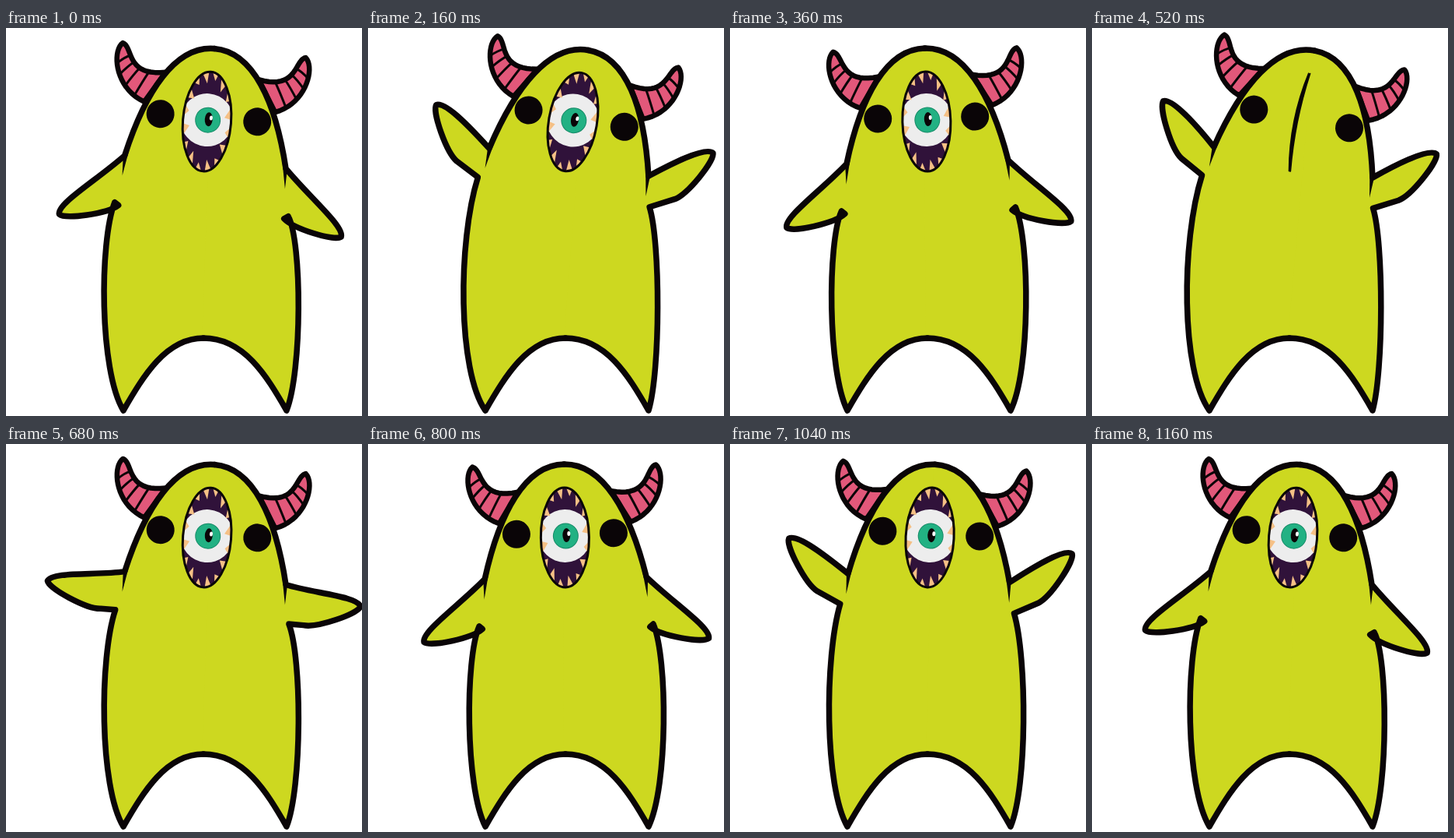
These frames come from a looping animation (458 by 498 pixels, 1.2 s). An HTML page with a canvas:

```html
<!DOCTYPE html>
<html lang="en">
<head>
<meta charset="utf-8">
<title>Dancing monster</title>
<style>
html, body { margin: 0; width: 100%; height: 100%; overflow: hidden; background: #fff; }
canvas { display: block; }
</style>
</head>
<body>
<canvas id="stage" width="458" height="498"></canvas>
<script>
const ctx = document.getElementById('stage').getContext('2d');
const STEP = 40, STEPS = 30, RAD = Math.PI / 180, TAU = Math.PI * 2;
const SKIN = '#cdd820', INK = '#0a0507', PINK = '#e2587a', TOOTH = '#f5c085';
const BLINK = 13;

// turning points: step, degrees
const ARM_SWING = [[0, 36], [4.3, -38], [9, 35], [13.2, -39], [20.6, 36], [25.6, -38], [29, 36]];
const HEAD_SWING = [[0, 0], [4.5, 5.4], [9, -5.9], [13.2, 6.4], [20.5, -5.5], [29, 0]];

let lean = 0, drop = 0;

function swing(keys, k) {
  const i = keys.findIndex(key => key[0] >= k);
  if (i < 1) return keys[0][1];
  const [t0, a] = keys[i - 1], [t1, b] = keys[i];
  return a + (b - a) * (1 - Math.cos(Math.PI * (k - t0) / (t1 - t0))) / 2;
}

const stageFrame = () => ctx.setTransform(1, 0, 0, 1, 0, 0);

// tilted frame with its origin at the neck, mirrored for side -1
function headFrame(side) {
  ctx.setTransform(1, 0, 0, 1, 254.5, 195);
  ctx.rotate((4.6 + lean) * RAD);
  ctx.scale(side, 1);
}

function oval(x, y, rx, ry, color) {
  ctx.fillStyle = color;
  ctx.beginPath();
  ctx.ellipse(x, y, rx, ry, 0, 0, TAU);
  ctx.fill();
}

function bezier(p0, p1, p2, p3) {
  return t => [0, 1].map(i => {
    const u = 1 - t;
    return u * u * u * p0[i] + 3 * u * u * t * p1[i] + 3 * u * t * t * p2[i] + t * t * t * p3[i];
  });
}

const hornOut = bezier([118, -167], [132, -155], [123, -103], [78, -92]);
const hornIn = bezier([118, -167], [104, -163], [111, -124], [60, -134]);

function horn(side) {
  headFrame(side);
  ctx.beginPath();
  for (let t = 0; t <= 1; t += 0.05) ctx.lineTo(...hornOut(t));
  for (let t = 1; t >= 0; t -= 0.05) ctx.lineTo(...hornIn(t));
  ctx.closePath();
  ctx.fillStyle = PINK;
  ctx.fill();
  ctx.lineWidth = 6.5;
  ctx.stroke();
  ctx.lineWidth = 3;
  for (let i = 0; i < 4; i++) {
    const t = 0.38 + i * 0.15, [x, y] = hornOut(t), [u, v] = hornIn(t);
    ctx.beginPath();
    ctx.moveTo(x, y);
    ctx.quadraticCurveTo((x + u) / 2 - 1, (y + v) / 2 - 3, u, v);
    ctx.stroke();
  }
}

// outline of one half, from the top of the head round to the crotch
function traceHalf(side) {
  ctx.beginPath();
  headFrame(side);
  ctx.moveTo(0, -169);
  ctx.bezierCurveTo(50, -169, 84, -108, 104, -23);
  ctx.translate(97, -3);
  ctx.rotate(drop * RAD);
  ctx.bezierCurveTo(42, -12, 100, -13, 105, 0);
  ctx.bezierCurveTo(102, 10, 52, 32, 34, 30);
  headFrame(side);
  ctx.lineTo(112, 27 + 0.3 * drop);
  stageFrame();
  const hip = 250.5 + side * 130.5 - 0.9 * lean;
  ctx.bezierCurveTo(hip, 275, hip, 440, 256 + side * 105, 491);
  ctx.bezierCurveTo(256 + side * 79, 446, 256 + side * 50, 398, 254, 398);
}

function body() {
  for (const side of [-1, 1]) {
    traceHalf(side);
    ctx.lineTo(254 - side * 2, 398);
    headFrame(side);
    ctx.lineTo(-2, -169);
    stageFrame();
    ctx.fillStyle = SKIN;
    ctx.fill();
  }
  for (const side of [-1, 1]) {
    traceHalf(side);
    ctx.lineWidth = 7.5;
    ctx.stroke();
    shoulder(side);
  }
}

// tapered end of the head line inside the shoulder
function shoulder(side) {
  headFrame(side);
  ctx.fillStyle = INK;
  ctx.beginPath();
  ctx.moveTo(99, -30);
  ctx.lineTo(106, -24);
  ctx.lineTo(105, 3);
  ctx.fill();
  stageFrame();
}

function closedMouth() {
  ctx.fillStyle = INK;
  ctx.beginPath();
  ctx.moveTo(2, -64);
  ctx.quadraticCurveTo(-11, 0, 1, 64);
  ctx.lineTo(3, 64);
  ctx.quadraticCurveTo(-4, 0, 4, -64);
  ctx.fill();
  ctx.lineWidth = 1.5;
  ctx.stroke();
}

function teeth(count) {
  ctx.fillStyle = TOOTH;
  for (let i = 0; i < count; i++) {
    const a = (i + 0.5) / count * TAU, depth = i % 2 ? 0.68 : 0.76;
    const at = (r, b) => ctx.lineTo(32 * r * Math.cos(b), 65 * r * Math.sin(b));
    ctx.beginPath();
    at(1, a - 0.13);
    at(1, a + 0.13);
    at(depth + 0.08 * Math.abs(Math.sin(a)), a + 0.05);
    ctx.fill();
  }
}

function openMouth(open) {
  ctx.scale(open, 1);
  const rim = new Path2D();
  rim.ellipse(0, 0, 31, 64, 0, 0, TAU);
  ctx.save();
  ctx.clip(rim);
  ctx.fillStyle = '#30123a';
  ctx.fillRect(-40, -70, 80, 140);
  oval(0, -2, 34, 34, '#ededed');
  teeth(16);
  oval(1, -2, 16.5, 16.5, '#178a68');
  oval(1, -2, 15.5, 15.5, '#22b183');
  oval(2, -3, 5, 9, INK);
  oval(5, -5, 2, 3, '#fff');
  ctx.restore();
  ctx.lineWidth = 3;
  ctx.stroke(rim);
}

function face(k) {
  headFrame(1);
  for (const side of [-1, 1]) oval(side * 62.5, -80, 18, 18, INK);
  ctx.translate(-2 - 0.35 * lean, -75);
  const open = Math.min(1, Math.abs(k - BLINK) / 2);
  if (open) openMouth(open);
  else closedMouth();
  stageFrame();
}

function draw(k) {
  drop = swing(ARM_SWING, k);
  lean = swing(HEAD_SWING, k);
  stageFrame();
  ctx.fillStyle = '#fff';
  ctx.fillRect(0, 0, 458, 498);
  ctx.strokeStyle = INK;
  ctx.lineJoin = ctx.lineCap = 'round';
  horn(-1);
  horn(1);
  stageFrame();
  body();
  face(k);
}

function tick() {
  draw(Math.floor(performance.now() / STEP) % STEPS);
  requestAnimationFrame(tick);
}
tick();
</script>
</body>
</html>
```
